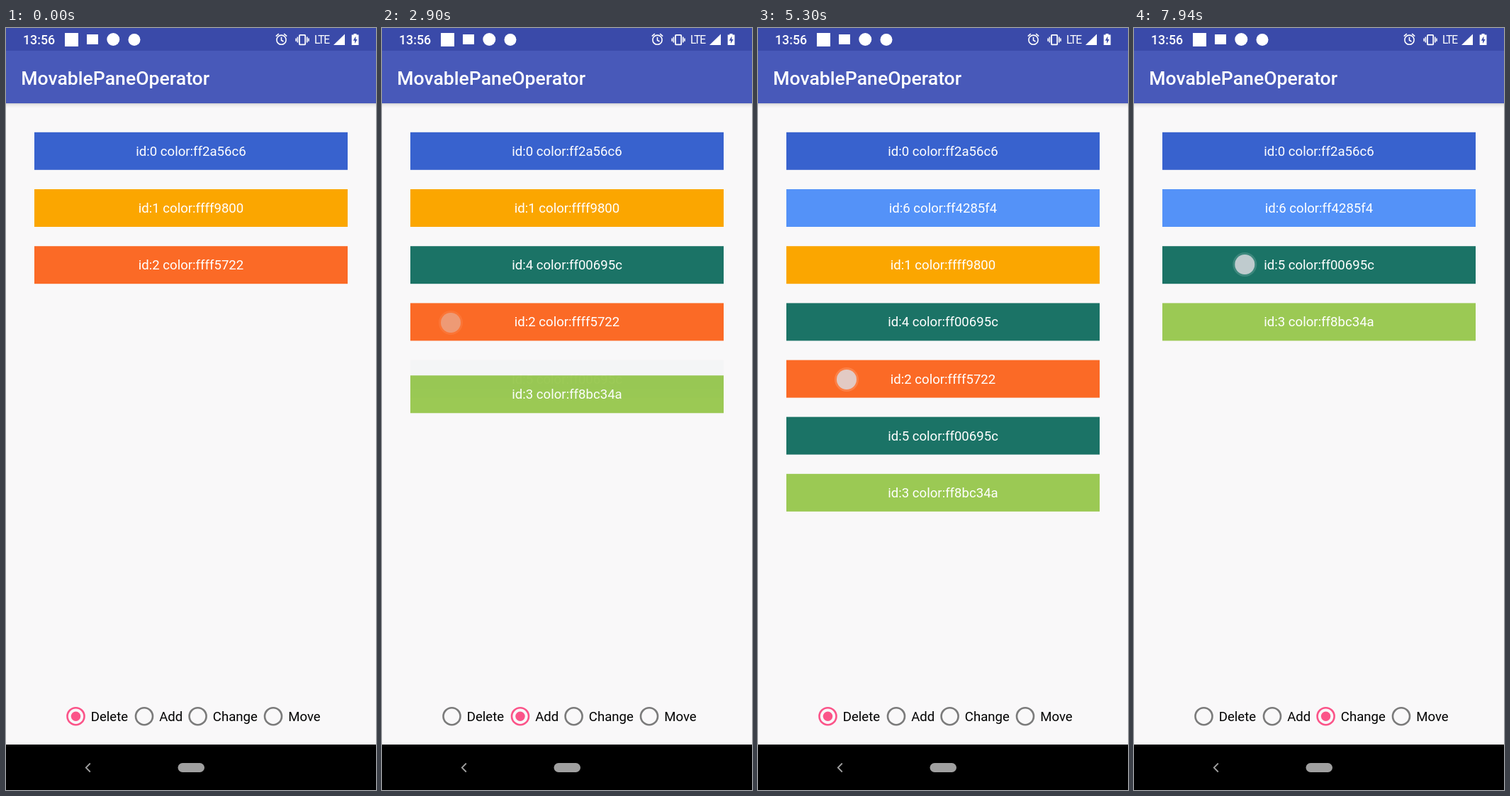
An HTML page for the animation above (8000 ms loop, 522 by 1073 pixels).

```html
<!DOCTYPE html>
<html lang="en">
<head>
<meta charset="utf-8">
<title>Animated list</title>
<style>
  html, body { margin: 0; width: 100%; height: 100%; overflow: hidden; background: #f9f8f9; }
  svg { display: block; width: 100%; height: 100%; }
  text { font-family: Roboto, sans-serif; font-size: 18.6px; }
  .row text { fill: #fff; text-anchor: middle; }
  .bold { font-weight: 500; fill: #fff; }
  .line { fill: none; stroke: #fff; }
</style>
</head>
<body>
<svg id="stage" viewBox="0 0 522 1073">
  <defs>
    <linearGradient id="shade" x2="0" y2="1">
      <stop offset="0" stop-color="#000" stop-opacity=".16"/>
      <stop offset=".4" stop-color="#000" stop-opacity=".05"/>
      <stop offset="1" stop-color="#000" stop-opacity="0"/>
    </linearGradient>
  </defs>
  <rect width="522" height="1073" fill="#f9f8f9"/>
  <rect y="106" width="522" height="7" fill="url(#shade)"/>
  <rect width="522" height="106" fill="#4859b9"/>
  <rect width="522" height="32" fill="#3a4aa9"/>
  <text class="bold" x="21.2" y="79.6" style="font-size:26.6px">MovablePaneOperator</text>

  <g id="status" fill="#fff">
    <text class="bold" x="24" y="23" style="font-size:17.8px">13:56</text>
    <rect x="83" y="7" width="19" height="19"/>
    <rect x="114" y="9" width="16" height="14"/>
    <circle cx="151.3" cy="16" r="9"/>
    <circle cx="181" cy="16.5" r="8.5"/>
    <g class="line" stroke-width="1.6">
      <circle cx="388.5" cy="16.7" r="6.6"/>
      <path d="M388.5 12.8v4.4l3 1.8M380.8 11.6l4-3.4M396.2 11.6l-4-3.4"/>
      <rect x="414" y="9.8" width="8.2" height="13.6" rx="1" stroke-width="1.8"/>
      <path d="M411.4 12.6v8M424.8 12.6v8M409.2 14.4v4.4M427 14.4v4.4"/>
    </g>
    <text x="435" y="22" style="font-size:15.6px;letter-spacing:-1.2px">LTE</text>
    <path d="M478 8.5V24H462z"/>
    <path d="M490.5 8h4v1.6h3V24h-9.8V9.6h2.8z"/>
    <path d="M493.4 11.5l-3.6 6.2h2.3v4.4l3.5-6.1h-2.2z" fill="#3a4aa9"/>
  </g>

  <g id="rows"></g>
  <g id="radios"></g>
  <rect y="1009" width="522" height="64" fill="#000"/>
  <path d="M118.8 1035.5l-6 6 6 6" fill="none" stroke="#a0a0a0" stroke-width="1.8"/>
  <rect x="242.5" y="1035" width="37.5" height="13" rx="6.5" fill="#a0a0a0"/>
  <g id="touch">
    <circle r="17" fill="#fff" opacity=".15"/>
    <circle r="14" fill="#dcdae0" opacity=".82"/>
  </g>
</svg>
<script>
const LOOP = 8000, STEP = 80, PHASE = 20;
const TOP = 146.8, PITCH = 80.2, ROW_H = 53;
const PINK = [251, 84, 137], GREY = [123, 123, 123];

// In list order; born and died are the start times of each row's transitions.
const rows = [
  { id: 0, code: 'ff2a56c6', fill: '#3862ce' },
  { id: 6, code: 'ff4285f4', fill: '#5492f8', born: 3400 },
  { id: 1, code: 'ffff9800', fill: '#fba600', died: 6264 },
  { id: 4, code: 'ff00695c', fill: '#1b7366', born: 2093, died: 5768 },
  { id: 2, code: 'ffff5722', fill: '#fb6a26', died: 5293 },
  { id: 5, code: 'ff00695c', fill: '#1b7366', born: 2813 },
  { id: 3, code: 'ff8bc34a', fill: '#9bc954', born: 1310 }
];
const radios = [
  { label: 'Delete', x: 98.5 },
  { label: 'Add', x: 195 },
  { label: 'Change', x: 270.6 },
  { label: 'Move', x: 377 }
];
// Radio presses: start time and chosen option.
const picks = [[500, 1], [4660, 0], [7220, 2]];
// Touches: start time, place, hold time.
const taps = [
  [500, 195, 971, 140], [1300, 100, 336, 60], [2100, 97, 255, 60],
  [2820, 97, 415, 60], [3380, 95, 171, 60], [4660, 99, 971, 140],
  [5300, 125, 495, 60], [5780, 129.5, 419, 60], [6260, 128, 336, 60],
  [7220, 271, 971, 140], [7940, 156.3, 333, 60]
];

const $ = id => document.getElementById(id);
const clamp = v => Math.min(1, Math.max(0, v));
const ease = v => 0.5 - 0.5 * Math.cos(Math.PI * clamp(v));
const mix = (a, b, k) => `rgb(${a.map((v, i) => Math.round(v + (b[i] - v) * k))})`;

function add(parent, tag, attrs = {}, text) {
  const el = document.createElementNS('http://www.w3.org/2000/svg', tag);
  for (const key in attrs) el.setAttribute(key, attrs[key]);
  if (text) el.textContent = text;
  return parent.appendChild(el);
}

// Earlier rows are painted over later ones.
for (const row of [...rows].reverse()) {
  row.el = add($('rows'), 'g', { class: 'row' });
  add(row.el, 'rect', { x: 40, width: 442, height: ROW_H, fill: row.fill });
  add(row.el, 'text', { x: 261, y: 33 }, `id:${row.id} color:${row.code}`);
}
for (const radio of radios) {
  const g = add($('radios'), 'g', { transform: `translate(${radio.x} 969.2)` });
  radio.ripple = add(g, 'circle', { fill: '#000' });
  radio.ring = add(g, 'circle', { r: 12, fill: 'none', 'stroke-width': 2.6 });
  radio.dot = add(g, 'circle', { fill: mix(PINK, PINK, 0) });
  add(g, 'text', { x: 21.2, y: 6.6 }, radio.label);
}

// How far a row is in the list, from 0 to 1.
function presence(row, t, delay, span) {
  const since = start => ease((t - start - delay) / span);
  const shown = row.born === undefined ? 1 : since(row.born);
  return row.died === undefined ? shown : shown * (1 - since(row.died));
}

function drawRows(t) {
  let slot = 0;
  for (const row of rows) {
    const alpha = presence(row, t, 76, 140);
    row.el.setAttribute('transform', `translate(0 ${TOP + slot * PITCH})`);
    row.el.setAttribute('opacity', alpha);
    slot += presence(row, t, 0, 250);
  }
}

function drawRadios(t) {
  const on = [1, 0, 0, 0], ripple = [0, 0, 0, 0], size = [0, 0, 0, 0];
  for (const [start, pick] of picks) {
    const dt = t - start;
    if (dt < 0) continue;
    const k = ease((dt - 100) / 150);
    on.forEach((v, i) => { on[i] = v * (1 - k) + (i === pick ? k : 0); });
    ripple[pick] = 0.12 * (1 - clamp((dt - 220) / 260));
    size[pick] = 10 + 16 * ease(dt / 200);
  }
  radios.forEach((radio, i) => {
    radio.ring.setAttribute('stroke', mix(GREY, PINK, on[i]));
    radio.dot.setAttribute('r', 6.7 * on[i]);
    radio.ripple.setAttribute('r', size[i]);
    radio.ripple.setAttribute('opacity', ripple[i]);
  });
}

function drawTouch(t) {
  let alpha = 0;
  for (const [start, x, y, hold] of taps) {
    if (t < start) break;
    alpha = 1 - clamp((t - start - hold) / 40);
    $('touch').setAttribute('transform', `translate(${x} ${y})`);
  }
  $('touch').setAttribute('opacity', alpha);
}

function draw(now) {
  const time = now % LOOP;
  const t = Math.max(0, Math.floor((time - PHASE) / STEP) * STEP + PHASE);
  drawRows(t);
  drawRadios(t);
  drawTouch(t);
}

const began = performance.now();
function tick() {
  draw(performance.now() - began);
  requestAnimationFrame(tick);
}
tick();
</script>
</body>
</html>
```
